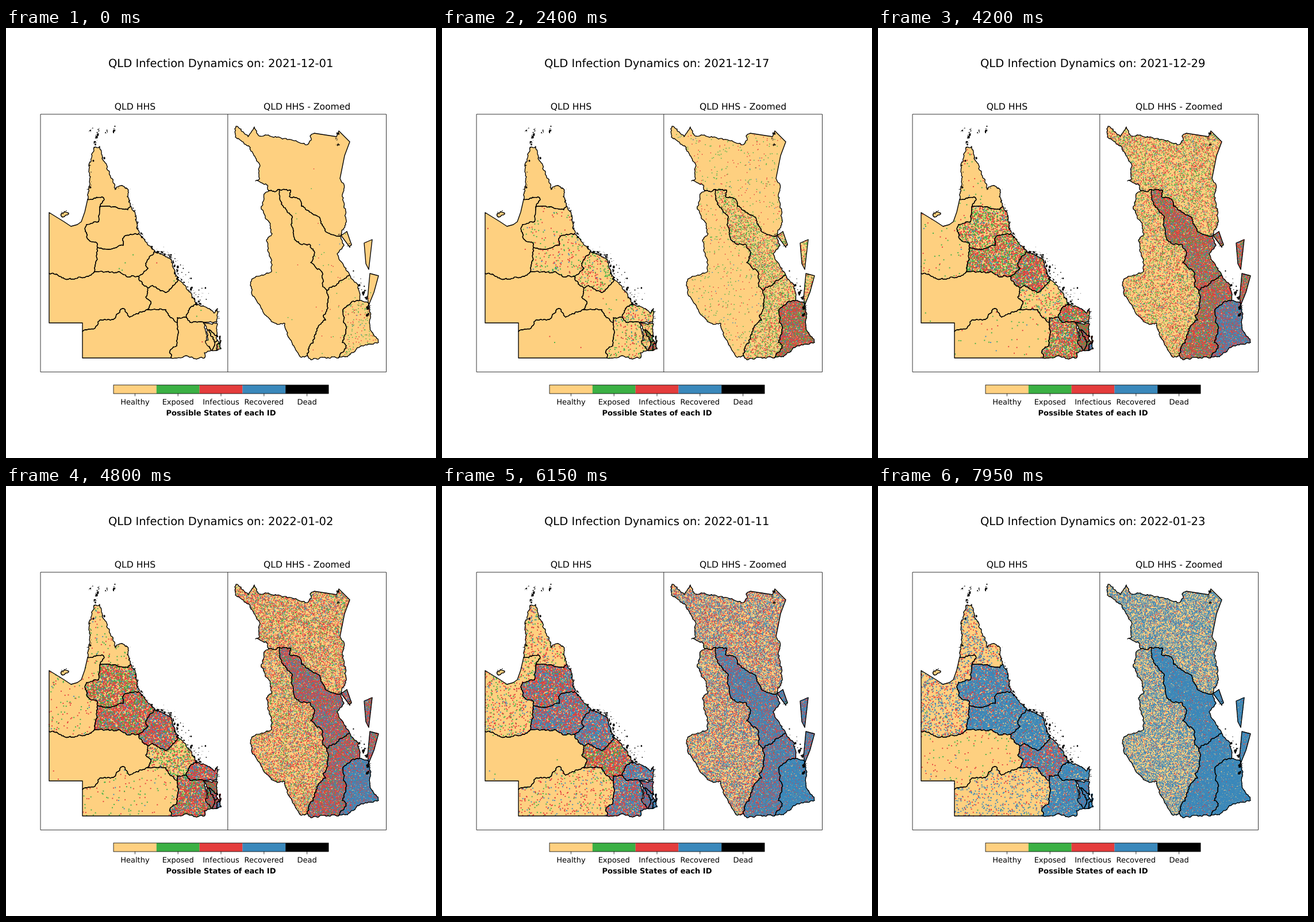
Animation of 748 by 748 pixels, one loop 8 s. Source, as an HTML page with a canvas:

```html
<!DOCTYPE html>
<html lang="en">
<head>
<meta charset="utf-8">
<title>Infection Dynamics</title>
<style>
html, body { margin: 0; width: 100%; height: 100%; overflow: hidden; background: #fff; }
canvas, svg { position: absolute; left: 0; top: 0; width: 748px; height: 748px; }
text { font: 13px "DejaVu Sans", sans-serif; text-anchor: middle; text-rendering: geometricPrecision; fill: #000; }
.title { font-size: 19.5px; }
.sub { font-size: 15.6px; }
.bold { font-weight: bold; }
.frame { fill: none; stroke: #000; stroke-width: .8; }
</style>
</head>
<body>
<canvas id="map" width="748" height="748"></canvas>
<svg viewBox="0 0 748 748">
  <text class="title" x="373.7" y="67.6" id="title"></text>
  <text class="sub" x="224.4" y="141.6">QLD HHS</text>
  <text class="sub" x="523.6" y="141.6">QLD HHS - Zoomed</text>
  <path class="frame" d="M60 150H661.5V598.3H60ZM385.8 150V598.3"/>
  <g id="legend"></g>
  <text class="bold" x="374" y="673.6">Possible States of each ID</text>
</svg>
<script>
const STEP = 150, LOOP = 8000;
const HEALTHY = "#fed080";
const COLORS = ["#3bb044", "#e43c3c", "#3a88bb"];
const INSET = { k: .123, x: 294.5, y: 490.6 };

let seed = 20211;
function rnd() {
  seed = (seed + 0x6D2B79F5) | 0;
  let t = Math.imul(seed ^ (seed >>> 15), 1 | seed);
  t = (t + Math.imul(t ^ (t >>> 7), 61 | t)) ^ t;
  return ((t ^ (t >>> 14)) >>> 0) / 4294967296;
}
const jitter = size => (rnd() - .5) * size;

// Key points of the shared borders; "=" marks smooth ones.
const arcs = {
  "=gulf": "75,321 101,337 113,345 124,342 131,337 137,320 142,298",
  capeCoast: "142,298 146,270 144,240 153,208 163,206 171,232 180,252 190,281 201,274 213,282 217,310",
  capeGulf: "142,298 156,296 170,296 163,311",
  capeCairns: "163,311 190,311 212,316 217,310",
  gulfCairns: "163,311 161,337 140,342 138,352 142,367 158,374 159,382",
  cairnsCoast: "217,310 226,326 231,358",
  cairnsTown: "159,382 185,384 204,378 203,366 208,361 231,358",
  gulfTown: "159,382 157,405 153,425",
  gulfWest: "75,427 108,437 137,434 153,425",
  townWest: "153,425 175,424 195,424 215,433 230,432",
  townCoast: "231,358 243,372 259,388",
  townMackay: "259,388 249,400 243,413 247,418 230,432",
  mackayCoast: "259,388 272,394 288,403 299,437",
  mackayCentral: "299,437 290,448 277,460 255,448 247,452",
  mackayWest: "230,432 233,440 247,452",
  centralWest: "247,452 243,468 252,476 246,490",
  southNorth: "133,528 155,522 160,511 188,506 203,488 215,503 246,490",
  centralSouth: "246,490 278,490 288,504 298,512",
  southDowns: "298,512 300,530 297,553 287,559 287,574",
  centralCoast: "299,437 318,456 333,481",
  centralBay: "333,481 319,488 314,504",
  centralDowns: "298,512 298,504 314,504",
  bayCoast: "333,481 350,487 362,496 368,488 367,511",
  baySouth: "314,504 320,512 344,512",
  bayEast: "344,512 367,511",
  downsEast: "344,512 350,535 347,545 357,561",
  downsSouth: "287,574 313,570 331,576 345,574 345,565 357,561",
  "=westSide": "75,321 75,427",
  "=westLow": "75,427 75,513 133,513 133,528",
  "=southSide": "133,528 133,574 287,574",
  isle: "96,323 104,320 109,322 98,329 96,323",

  sunWest: "400,171 399,190 425,208 440,235 441,262 434,266 452,271 457,283",
  sunNorth: "400,171 409,176 421,189 432,172 439,187 478,191 524,203 531,195 529,188 536,183",
  "=sunTop": "536,183 575,189 579,179 598,198 589,222 581,262",
  sunCoast: "581,262 587,270 585,290 592,335 581,362",
  sunMoreton: "457,283 465,284 476,281",
  sunMetro: "476,281 495,282 493,293 512,300 514,310 543,328 557,355 581,362",
  moretonMetro: "476,281 477,300 498,330 502,367 515,377 527,376 536,388 530,408 550,425 551,450 558,456",
  metroCoast: "581,362 588,378 576,393 588,415 598,430",
  metroSouth: "558,456 580,440 598,430",
  bayside: "598,430 613,447 615,474",
  goldWest: "615,474 601,477 586,490 587,512 592,520 585,547 592,553 578,574",
  moretonSouth: "558,456 560,487 552,500 556,508 543,520 534,548 527,555 524,570",
  southEnd: "524,570 530,577 560,573 578,574",
  goldCoast: "615,474 632,480 633,520 648,547 613,556 590,572 578,574",
  moretonWest: "457,283 450,288 444,315 458,338 463,358 453,370 463,412 460,425 435,432 427,440 427,460 440,480 452,500 470,514 485,514 493,540 514,573 524,570",
  "=bribie": "583,361 593,354 601,377 597,380 583,361",
  "=moretonIsle": "623,374 637,368 631,420 626,410 623,374",
  "=straddie": "633,427 648,431 640,460 631,482 629,470 633,427"
};

// Splits a border at its middle, shifted sideways, down to small pieces.
function crinkle(a, b, out) {
  const dx = b[0] - a[0], dy = b[1] - a[1], len = Math.hypot(dx, dy);
  if (len > 3.5) {
    const shift = jitter(Math.min(.55, 3.2 / len));
    const mid = [a[0] + dx / 2 - dy * shift, a[1] + dy / 2 + dx * shift];
    crinkle(a, mid, out);
    crinkle(mid, b, out);
  } else out.push(b);
}
const lines = {};
for (const key in arcs) {
  const pts = arcs[key].split(" ").map(p => p.split(",").map(Number));
  const out = [pts[0]];
  for (let i = 1; i < pts.length; i++) {
    if (key[0] === "=") out.push(pts[i]);
    else crinkle(pts[i - 1], pts[i], out);
  }
  lines[key.replace("=", "")] = out;
}

const ctx = document.getElementById("map").getContext("2d");

// ring of borders ("-" reverses one), dots per square pixel, day when half are caught
function region(ring, density, mid, size) {
  const pts = ring.split(" ").flatMap(k =>
    k[0] === "-" ? lines[k.slice(1)].slice().reverse() : lines[k]);
  const path = new Path2D();
  let area = 0;
  pts.forEach(([x, y], i) => {
    const [px, py] = pts[(i || pts.length) - 1];
    area += (px * y - x * py) / 2;
    path.lineTo(x, y);
  });
  path.closePath();
  const xs = pts.map(p => p[0]), ys = pts.map(p => p[1]);
  const x0 = Math.min(...xs), w = Math.max(...xs) - x0;
  const y0 = Math.min(...ys), h = Math.max(...ys) - y0;
  const dots = [], count = Math.round(Math.abs(area) * density);
  const spread = 3 + mid / 30;
  while (dots.length < count) {
    const x = x0 + rnd() * w, y = y0 + rnd() * h;
    if (!ctx.isPointInPath(path, x, y)) continue;
    const u = rnd() * .9998 + .0001;
    const caught = mid + spread * Math.log(u / (1 - u));
    const ill = caught + 2 + rnd() * 2;
    dots.push({ x, y, caught, ill, well: ill + 4 - 6 * Math.log(1 - rnd()) });
  }
  return { path, dots, size };
}

const state = [
  ["capeCoast -capeCairns -capeGulf", .08, 37],
  ["gulf capeGulf gulfCairns gulfTown -gulfWest -westSide", .085, 39],
  ["capeCairns cairnsCoast -cairnsTown -gulfCairns", .6, 31],
  ["cairnsTown townCoast townMackay -townWest -gulfTown", .6, 28],
  ["mackayCoast mackayCentral -mackayWest -townMackay", .6, 25],
  ["gulfWest townWest mackayWest centralWest -southNorth -westLow", .05, 60],
  ["centralCoast centralBay -centralDowns -centralSouth -centralWest -mackayCentral", .6, 38],
  ["bayCoast -bayEast -baySouth -centralBay", .6, 24],
  ["southNorth centralSouth southDowns -southSide", .045, 37],
  ["centralDowns baySouth downsEast -downsSouth -southDowns", .6, 27],
  ["isle", 0, 40]
].map(r => region(...r, 1.9));

const zoomed = [
  ["sunNorth sunTop sunCoast -sunMetro -sunMoreton -sunWest", .36, 28],
  ["sunMoreton moretonMetro moretonSouth -moretonWest", .34, 28],
  ["sunMetro metroCoast -metroSouth -moretonMetro", 1.4, 23.5],
  ["metroSouth bayside goldWest -southEnd -moretonSouth", 1.4, 23.5],
  ["goldCoast -goldWest", 1.5, 12.5],
  ["bribie", 1.4, 24],
  ["moretonIsle", 1.4, 23],
  ["straddie", 1.4, 23]
].map(r => region(...r, 1.45));

// Islets strewn between a border and its copy shifted by dx, dy
function islets(path, key, count, dx, dy) {
  for (let i = 0; i < count; i++) {
    const pts = lines[key], f = rnd() * rnd(), r = .35 + rnd() * rnd() * 1.6;
    const [px, py] = pts[Math.floor(rnd() * pts.length)];
    const x = px + dx * f + jitter(4), y = py + dy * f + jitter(4);
    path.moveTo(x + r, y);
    path.ellipse(x, y, r, r * (.6 + rnd() * .8), 0, 0, 7);
  }
}
lines.strait = [[154, 203], [157, 190], [160, 179], [174, 184], [188, 180], [146, 180]];
lines.passage = [[577, 184], [575, 194], [576, 203]];
lines.harbour = [[620, 462], [626, 470], [628, 488], [629, 500]];
const reefs = new Path2D(), inlets = new Path2D();
islets(reefs, "strait", 75, 4, -10);
islets(reefs, "capeCoast", 26, 4, -3);
islets(reefs, "cairnsCoast", 22, 4, -2);
islets(reefs, "townCoast", 22, 6, -4);
islets(reefs, "mackayCoast", 90, 18, -8);
islets(reefs, "centralCoast", 55, 28, -14);
islets(reefs, "bayCoast", 16, 3, -3);
islets(reefs, "isle", 10, 3, -2);
islets(inlets, "passage", 34, 3, -2);
islets(inlets, "harbour", 110, 6, -6);
islets(inlets, "bribie", 18, -8, -4);
islets(inlets, "bayside", 14, 8, -16);

function drawDots({ dots, size }, day, inset) {
  let last = -1;
  const h = size / 2;
  for (let i = 0; i < dots.length; i += inset ? 6 : 1) {
    const d = dots[i];
    if (d.caught > day) continue;
    const s = day < d.ill ? 0 : day < d.well ? 1 : 2;
    if (s !== last) ctx.fillStyle = COLORS[last = s];
    const x = inset ? INSET.x + d.x * INSET.k : d.x;
    const y = inset ? INSET.y + d.y * INSET.k : d.y;
    ctx.fillRect(x - h, y - h, size, size);
  }
}

function drawMap(regions, extra, day, inset) {
  const fit = () => {
    ctx.save();
    if (inset) ctx.setTransform(INSET.k, 0, 0, INSET.k, INSET.x, INSET.y);
  };
  fit();
  ctx.fillStyle = HEALTHY;
  for (const r of regions) ctx.fill(r.path);
  ctx.restore();
  for (const r of regions) drawDots(r, day, inset);
  fit();
  ctx.lineWidth = inset ? 10.5 : 1.35;
  ctx.lineJoin = "round";
  ctx.strokeStyle = ctx.fillStyle = "#000";
  for (const r of regions) ctx.stroke(r.path);
  ctx.fill(extra);
  ctx.restore();
}

const names = ["Healthy", "Exposed", "Infectious", "Recovered", "Dead"];
const fills = [HEALTHY, ...COLORS, "#000"];
document.getElementById("legend").innerHTML = names.map((name, i) => {
  const x = 187 + i * 74.8, mid = x + 37.4;
  return `<rect x="${x}" y="621" width="74.9" height="15" fill="${fills[i]}"/>
    <path class="frame" d="M${mid} 636v4.5"/><text x="${mid}" y="655">${name}</text>`;
}).join("") + '<rect class="frame" x="187" y="621" width="374" height="15"/>';

const title = document.getElementById("title");
function draw(day) {
  const date = new Date(Date.UTC(2021, 11, 1 + day)).toISOString().slice(0, 10);
  title.textContent = "QLD Infection Dynamics on: " + date;
  ctx.clearRect(0, 0, 748, 748);
  drawMap(state, reefs, day, false);
  drawMap(zoomed, inlets, day, true);
  drawMap(zoomed, inlets, day, false);
}

const start = performance.now();
let shown = -1;
function tick() {
  const day = Math.floor((performance.now() - start) % LOOP / STEP);
  if (day !== shown) draw(shown = day);
  requestAnimationFrame(tick);
}
tick();
</script>
</body>
</html>
```
